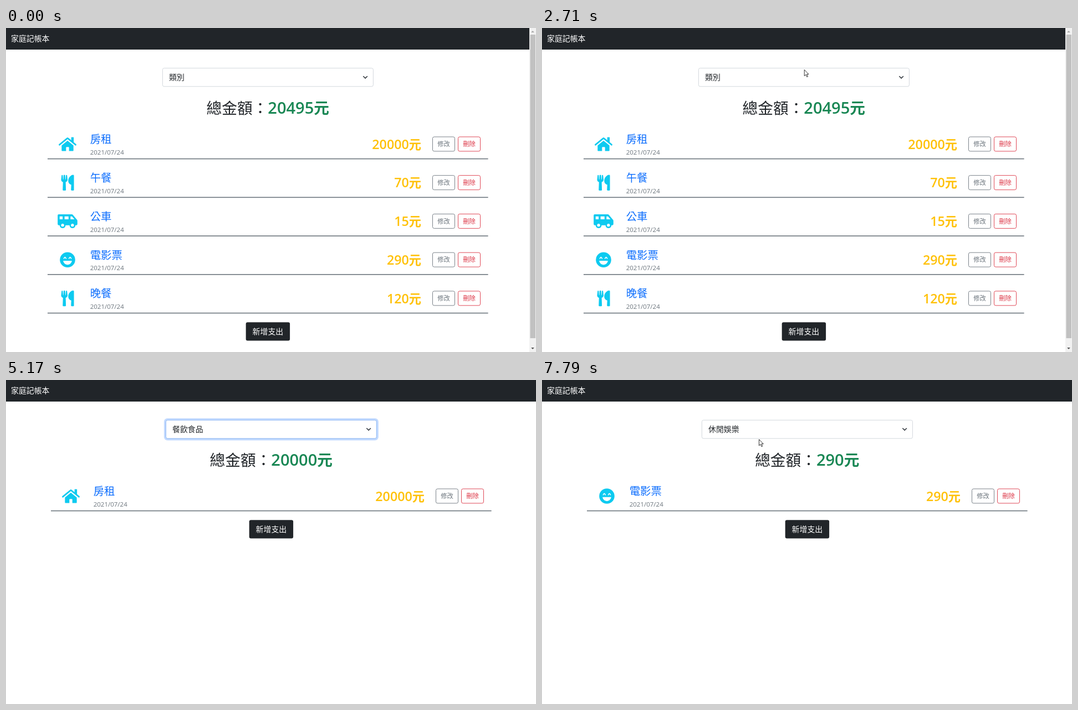
These frames come from a looping animation (956x586 px, 7.99 s). An HTML page:

```html
<!DOCTYPE html>
<html lang="zh-Hant">
<head>
<meta charset="utf-8">
<title>家庭記帳本</title>
<style>
  html, body { margin: 0; width: 100%; height: 100%; overflow: hidden; background: #fff; }
  svg { display: block; width: 100vw; height: 100vh; }
  text { font: 13.9px 'Open Sans', 'Noto Sans CJK TC', 'Noto Sans CJK', sans-serif; fill: #212529; }
  .total { font-size: 27.7px; font-weight: 300; }
  .total .money { fill: #198754; }
  .digits { font-size: 1.05em; }
  .money { font-weight: 600; }
  .amount { font-size: 22.2px; font-weight: 600; fill: #ffc107; }
  .name { font-size: 19.4px; font-weight: 500; fill: #0d6efd; }
  .date { font-size: 11.5px; fill: #6c757d; }
  .small { font-size: 11.3px; }
  .light { fill: #fff; }
  .list { filter: drop-shadow(1px 2px 3px #0005); }
</style>
</head>
<body>
<svg id="stage" viewBox="0 0 956 586" preserveAspectRatio="none"></svg>
<script>
const LOOP = 7990, ROW = 69.75, OPTION = 18.1, LIST_TOP = 107;
const categories = ['類別', '家居物業', '餐飲食品', '交通出行', '休閒娛樂', '其他'];
const expenses = [
  { name: '房租', cost: 20000, category: 1 },
  { name: '午餐', cost: 70, category: 2 },
  { name: '公車', cost: 15, category: 3 },
  { name: '電影票', cost: 290, category: 4 },
  { name: '晚餐', cost: 120, category: 2 },
];

// Each visit to the menu: opened, option clicked, filtered page loaded.
const visits = [
  { open: 3140, close: 3770, load: 3930, pick: 1 },
  { open: 4350, close: 5100, load: 5290, pick: 2 },
  { open: 5760, close: 6480, load: 6610, pick: 3 },
  { open: 6960, close: 7510, load: 7640, pick: 4 },
];

// time, x, y of the pointer tip
const pointerPath = [
  [120, 885, 556], [350, 640, 330], [540, 457, 201], [680, 469, 230],
  [1150, 469, 230], [1500, 543, 331], [2030, 543, 331], [2300, 748, 249],
  [2450, 767, 248], [2710, 473, 75], [3000, 395, 84], [3210, 372, 98],
  [3350, 357, 137], [3820, 357, 135], [4100, 372, 97], [4350, 372, 97],
  [4500, 374, 150], [4640, 374, 150], [4700, 374, 163], [4780, 374, 163],
  [4850, 373, 156], [5240, 373, 150], [5500, 372, 93], [5900, 372, 93],
  [5990, 373, 161], [6200, 374, 171], [6480, 374, 171], [6690, 376, 96],
  [6970, 376, 96], [7310, 380, 186], [7510, 380, 186], [7780, 391, 107],
];
const scrollPath = [[850, 0], [950, 12], [1020, 13], [1240, 13], [1370, 3], [1500, 0]];

// Drawn on a 512-unit-high grid, by category.
const icons = {
  1: { width: 576, shape: `<path d="M96 300L288 142 480 300V464Q480 480 464 480H336V368Q336 352 320 352H256Q240 352 240 368V480H112Q96 480 96 464Z"/>
      <path d="M408 150V44Q408 32 420 32H476Q488 32 488 44V215Z"/>
      <path d="M28 276L270 77Q288 62 306 77L548 276" fill="none" stroke="#0dcaf0" stroke-width="54" stroke-linecap="round"/>
      <path d="M56 300L288 110 520 300" fill="none" stroke="#fff" stroke-width="18"/>` },
  2: { width: 416, shape: `<path d="M16 12L0 155Q0 215 60 238L51 487Q52 512 78 512H131Q156 512 156 487L148 238Q208 215 208 155L192 12Q174-8 156 12L146 150H136L128 12Q104-10 80 12L72 150H62L52 12Q34-8 16 12Z"/>
      <path d="M231 192C231 90 320 0 392 0Q416 2 416 24V488Q416 512 392 512H344Q320 512 320 486L328 325Q231 290 231 192Z"/>` },
  3: { width: 640, shape: `<path fill-rule="evenodd" d="M32 32H458Q480 32 494 49L629 211Q640 224 640 241V352Q640 384 608 384H32Q0 384 0 352V64Q0 32 32 32ZM64 96v96h96v-96zM224 96v96h128v-96zM416 96v96h128l-80-96z"/>
      <circle cx="160" cy="384" r="96"/><circle cx="480" cy="384" r="96"/>
      <g fill="#fff"><circle cx="160" cy="384" r="48"/><circle cx="480" cy="384" r="48"/></g>` },
  4: { width: 496, shape: `<circle cx="248" cy="256" r="248"/>
      <path d="M108 288H388C380 362 322 416 248 416S116 362 108 288Z" fill="#fff"/>
      <path d="M130 214Q165 130 200 214M296 214Q331 130 366 214" fill="none" stroke="#fff" stroke-width="28" stroke-linecap="round"/>` },
};

const stage = document.getElementById('stage');

function along(path, t) {
  if (t <= path[0][0]) return path[0].slice(1);
  const next = path.findIndex(key => key[0] > t);
  if (next < 0) return path.at(-1).slice(1);
  const [from, to] = [path[next - 1], path[next]];
  const k = (t - from[0]) / (to[0] - from[0]);
  return from.slice(1).map((v, i) => v + (to[i + 1] - v) * k);
}

const label = (x, y, content, cls = '', attrs = '') =>
  `<text x="${x}" y="${y}" class="${cls}" ${attrs}>${content}</text>`;
const box = (x, y, w, h, attrs) => `<rect x="${x}" y="${y}" width="${w}" height="${h}" ${attrs}/>`;
const money = n => `<tspan class="digits">${n}</tspan>元`;

function smallButton(x, caption, color) {
  return box(x + .5, 196.9, 40, 26, `rx="2.8" fill="#fff" stroke="${color}" stroke-width=".9"`) +
    label(x + 20.5, 214, caption, 'small', `text-anchor="middle" style="fill:${color}"`);
}

function expenseRow({ name, cost, category }, index) {
  const { width, shape } = icons[category], scale = .0556;
  return `<g transform="translate(0 ${index * ROW})">
    <g fill="#0dcaf0" transform="translate(${111 - width * scale / 2} 195.8) scale(${scale})">${shape}</g>` +
    label(151.7, 208.3, name, 'name') + label(151.7, 229, '2021/07/24', 'date') +
    label(749, 218.5, money(cost), 'amount', 'text-anchor="end"') +
    smallButton(769, '修改', '#6c757d') + smallButton(815, '刪除', '#dc3545') +
    box(75, 235.8, 794.6, 1.6, 'fill="#6c757d"') + '</g>';
}

function selectBox(choice, ring) {
  return box(280.7, 70.9, 383.4, 36.6, `rx="4.5" fill="none" stroke="#0d6efd" stroke-width="3.5" opacity="${.25 * ring}"`) +
    box(282.4, 72.6, 380, 33.2, 'rx="3" fill="#fff" stroke="#ced4da" stroke-width=".9"') +
    box(282.4, 72.6, 380, 33.2, `rx="3" fill="none" stroke="#86b7fe" stroke-width=".9" opacity="${ring}"`) +
    label(294, 94, categories[choice]) +
    '<path d="M644.7 87.5l3.4 3.4 3.4-3.4" fill="none" stroke="#343a40" stroke-width="1.5" stroke-linecap="round" stroke-linejoin="round"/>';
}

function optionList(hovered) {
  return box(282.5, 106.5, 379.5, 109.5, 'class="list" fill="#fff" stroke="#767676"') +
    categories.map((name, i) => {
      const active = i === hovered;
      return (active ? box(283, LIST_TOP + i * OPTION, 378.5, OPTION, 'fill="#1e90ff"') : '') +
        label(294, 120.7 + i * OPTION, name, active ? 'light' : '');
    }).join('');
}

function scrollbar(scroll) {
  return box(944, 0, 12, 586, 'fill="#f1f1f1"') +
    box(945.5, 12 + scroll * .92, 9.5, 549, 'fill="#c1c1c1"') +
    `<path d="M947.2 8l2.8-3 2.8 3z" fill="${scroll > 0 ? '#505050' : '#a3a3a3'}"/>` +
    '<path d="M947.2 578l2.8 3 2.8-3z" fill="#505050"/>';
}

function draw(t) {
  const [x, y] = along(pointerPath, t);
  const [scroll] = along(scrollPath, t);
  const chosen = visits.findLast(v => t >= v.close)?.pick ?? 0;
  const filter = visits.findLast(v => t >= v.load)?.pick ?? 0;
  const focus = visits.find(v => t >= v.open && t < v.load);
  const ring = focus ? Math.min(1, (t - focus.open) / 150) : 0;
  const hovered = y < LIST_TOP ? chosen : Math.floor((y - LIST_TOP) / OPTION);
  const shown = expenses.filter(e => !filter || e.category === filter);
  const total = shown.reduce((sum, e) => sum + e.cost, 0);
  const addTop = 254 + (shown.length - 1) * ROW;
  const pointerVisible = t >= 120 && !(t >= 5100 && t < 5240);

  stage.innerHTML = `<g transform="translate(0 ${-scroll})">` +
    box(0, 0, 956, 39, 'fill="#212529"') + label(9, 24, '家庭記帳本', 'light') +
    `<g transform="translate(${filter ? 6 : 0} 0)">` +
    label(472.3, 155, `總金額：<tspan class="money">${money(total)}</tspan>`, 'total', 'text-anchor="middle"') +
    shown.map(expenseRow).join('') +
    box(432.7, addTop - .8, 79.4, 33.4, 'rx="3" fill="#212529"') +
    label(472.4, addTop + 20.8, '新增支出', 'light', 'text-anchor="middle"') +
    selectBox(chosen, ring) +
    (focus && t < focus.close ? optionList(hovered) : '') + '</g></g>' +
    (filter ? '' : scrollbar(scroll)) +
    (pointerVisible ? `<path transform="translate(${x + .5} ${y + .5})" d="M0 0V11.2L2.6 8.8 4.5 13 6.3 12.2 4.4 8.1H7.8Z" fill="#fff" stroke="#000" stroke-width=".8"/>` : '');
}

const start = performance.now();
function tick() {
  draw((performance.now() - start) % LOOP);
  requestAnimationFrame(tick);
}
tick();
</script>
</body>
</html>
```
